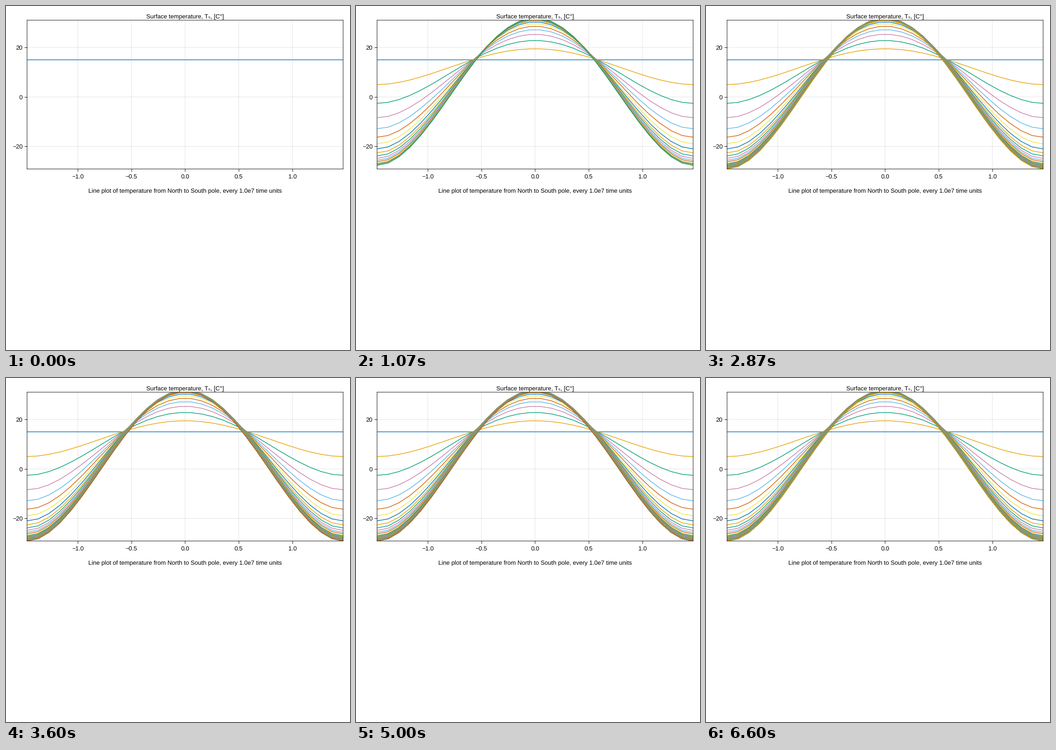
Animation, 748 px wide and 748 px high, one loop 6670 ms. Source, as a matplotlib script:

```python
import numpy as np
import matplotlib.pyplot as plt
from matplotlib.animation import FuncAnimation
from matplotlib.collections import LineCollection

CURVES, SUB, LOOP = 100, 3, 6670  # SUB ticks per new curve
FRAMES = CURVES * SUB
SIZE = 748
PX = SIZE / 800  # pixels per layout unit
UNIT = 0.72      # points per layout unit
COLORS = ["#0072B2", "#E69F00", "#009E73", "#CC79A7",
          "#56B4E9", "#D55E00", "#F0E442"]

plt.rcParams.update({
    "font.family": ["Liberation Sans", "DejaVu Sans"],
    "font.size": 14 * UNIT,
    "text.hinting": "none",
})


def climate(n=30, D=0.6, A=210.0, B=2.0, depth=50):
    """Energy balance model: latitudes, decay matrix and forcing, dT/dt = f - M T."""
    edge = np.pi / 2 - np.pi / 32
    phi = np.linspace(-edge, edge, n)
    h = phi[1] - phi[0]
    albedo = 0.354 + 0.25 * 0.5 * (3 * phi**2 - 1)
    heat = 1000 * 4186 * depth
    cell = np.full(n, h)
    cell[[0, -1]] = h / 2
    grad = np.diff(np.eye(n), axis=0) / h
    mid = np.cos((phi[1:] + phi[:-1]) / 2)
    lap = -grad.T * h @ (mid[:, None] * grad)
    M = (B * np.eye(n) - D * lap / (np.cos(phi) * cell)[:, None]) / heat
    f = ((1 - albedo) * 450 * np.cos(phi) - A) / heat
    return phi, M, f


phi, M, f = climate()
rates, modes = np.linalg.eig(M)
rates, modes = rates.real, modes.real
steady = np.linalg.solve(M, f)
start = np.linalg.solve(modes, 15 - steady)


def temperature(t):
    return steady + modes @ (np.exp(-rates * t) * start)


fig = plt.figure(figsize=(8, 8), dpi=SIZE / 8, facecolor="white")
left, right, top, bottom = 49 * PX, 784 * PX, 33 * PX, 379 * PX
ax = fig.add_axes([left / SIZE, 1 - bottom / SIZE,
                   (right - left) / SIZE, (bottom - top) / SIZE])
final = temperature(CURVES * 1e7)
ax.set_xlim(phi[0], phi[-1])
ax.set_ylim(final.min(), final.max())
xticks = np.arange(-1, 1.1, 0.5)
yticks = [-20, 0, 20]
ax.set_xticks(xticks, [""] * len(xticks))
ax.set_yticks(yticks, [""] * len(yticks))
ax.tick_params(length=6 * UNIT, width=UNIT)
ax.grid(color="black", alpha=0.12, linewidth=UNIT)
ax.set_axisbelow(True)
for spine in ax.spines.values():
    spine.set(linewidth=UNIT, zorder=200, snap=False)
for line in (ax.get_xgridlines() + ax.get_ygridlines()
             + ax.get_xticklines() + ax.get_yticklines()):
    line.set_snap(False)


def label(x, y, s, ha="center"):
    fig.text(x / SIZE, 1 - y / SIZE, s, ha=ha, va="baseline", color="black")


def number(v, digits):
    return f"{v:.{digits}f}".replace("-", "\u2212")


for v in xticks:
    x = left + (v - phi[0]) / (phi[-1] - phi[0]) * (right - left)
    label(x, 374.6, number(v, 1))
for v in yticks:
    y = bottom - (v - final.min()) / np.ptp(final) * (bottom - top)
    label(36.2, y + 4.7, number(v, 0), "right")

mid_x = (left + right) / 2
label(mid_x, 27.6, "Surface temperature, T\u209b, [C\u00b0]")
label(mid_x, 405.8, "Line plot of temperature from North to South pole, "
                    "every 1.0e7 time units")

curves = [np.column_stack([phi, temperature(k * 1e7)]) for k in range(CURVES)]
stack = LineCollection([], colors=COLORS, linewidths=1.5 * UNIT, zorder=3,
                       capstyle="butt", joinstyle="miter", snap=False)
ax.add_collection(stack, autolim=False)


def update(i):
    stack.set_segments(curves[:(i + 1) // SUB + 1])
    return [stack]


anim = FuncAnimation(fig, update, frames=FRAMES, interval=LOOP / FRAMES,
                     repeat=True, repeat_delay=0, blit=False)
plt.show()
```
